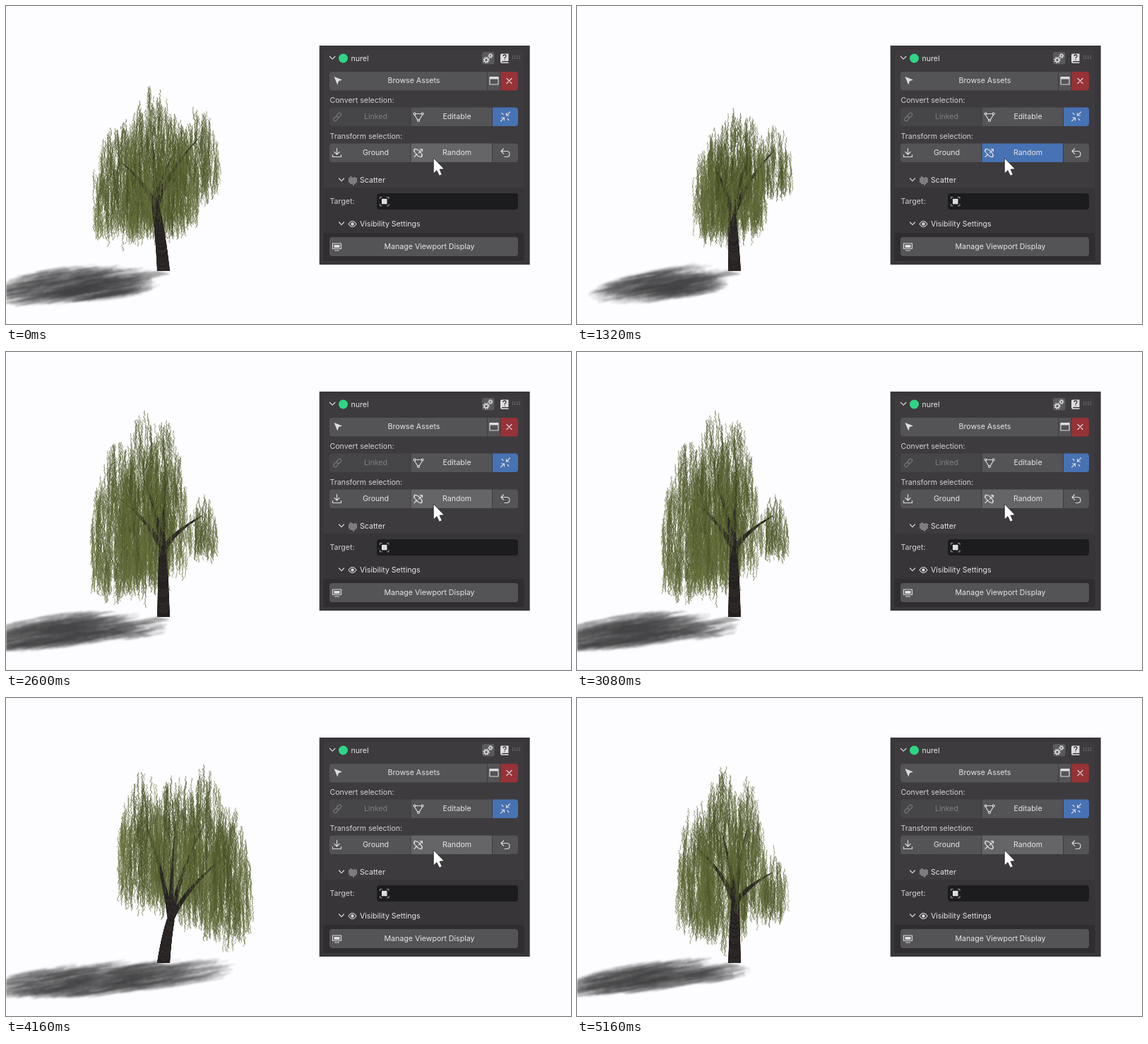
Animation, 800 px wide and 450 px high, one loop 5200 ms. Source, as an HTML page with a canvas:

```html
<!DOCTYPE html>
<html lang="en">
<head>
<meta charset="utf-8">
<title>Random transform</title>
<style>
  html, body { margin: 0; width: 100%; height: 100%; overflow: hidden; background: #fdfcfe; }
  canvas, svg { position: absolute; left: 0; top: 0; width: 800px; height: 450px; }
  text { font: 10.6px Inter, "Open Sans", sans-serif; fill: #e6e5e6; }
  .label { fill: #d2d1d3; }
  .mid { text-anchor: middle; }
  .btn { fill: #545356; }
  .line { fill: none; stroke: #d8d7d9; stroke-width: 1.2; stroke-linecap: round; stroke-linejoin: round; }
  .solid { fill: #dddcde; }
</style>
</head>
<body>
<canvas id="stage" width="800" height="450"></canvas>
<svg viewBox="0 0 800 450">
  <!-- panel -->
  <rect x="443.7" y="56" width="298" height="310" fill="#39373a"/>
  <rect x="449.5" y="62" width="284" height="299" rx="4" fill="#3d3b3e"/>
  <rect x="449.5" y="257" width="284" height="104" rx="3" fill="#373538"/>
  <rect x="449.5" y="321" width="284" height="40" rx="3" fill="#2f2d30"/>

  <!-- header -->
  <path class="line" d="M458.5 71.5l3.7 3.7 3.7-3.7M471.5 244l3.5 3.7 3.5-3.7M471.5 306l3.5 3.7 3.5-3.7"/>
  <circle cx="477.5" cy="74" r="6.5" fill="#2fd584"/>
  <text x="488.5" y="77.5">nurel</text>
  <rect x="674" y="65" width="17.5" height="17.5" rx="3" fill="#5a595c"/>
  <g fill="none" stroke="#e0dfe1">
    <circle cx="680" cy="76.5" r="2.5" stroke-width="1.5"/>
    <circle cx="680" cy="76.5" r="4" stroke-width="1.4" stroke-dasharray="1.6 1.54"/>
    <circle cx="686" cy="70.5" r="1.8" stroke-width="1.3"/>
    <circle cx="686" cy="70.5" r="3" stroke-width="1.2" stroke-dasharray="1.3 1.06"/>
  </g>
  <path class="solid" d="M702 67.5h9.5v10.5h-9a1 1 0 0 0 0 1.5h9v1.5h-9.5q-2-.5-2-2.5v-9q0-2 2-2z"/>
  <path d="M704 71q0-2 2-2t2 2q0 1-1.9 2.2v1M706.1 75.5v1" fill="none" stroke="#39373a" stroke-width="1.3"/>
  <path d="M717 71h11M717 73.8h11" stroke="#99989a" stroke-width="1.2" stroke-dasharray="1.2 2"/>

  <!-- browse row -->
  <path class="btn" d="M462 93h219v26.5h-219q-4 0-4-4v-18.5q0-4 4-4zM682 93h17.5v26.5h-17.5z"/>
  <path d="M700.5 93h20.5q4 0 4 4v18.5q0 4-4 4h-20.5z" fill="#973236"/>
  <path class="solid" d="M464.5 100l11.5 4.5-5 1.7-1.7 5.3z"/>
  <text class="mid" x="577.5" y="109.3">Browse Assets</text>
  <path class="line" d="M685 100.5h12v10.5h-12z"/>
  <path class="solid" d="M685 100h12v3.5h-12z"/>
  <path class="line" d="M709 102.5l7 7M716 102.5l-7 7"/>

  <!-- convert row -->
  <text class="label" x="458.5" y="137">Convert selection:</text>
  <path d="M462 143.5h110.5v26.5h-110.5q-4 0-4-4v-18.5q0-4 4-4z" fill="#464548"/>
  <path class="btn" d="M573.5 143.5h114.5v26.5h-114.5z"/>
  <path d="M689 143.5h32q4 0 4 4v18.5q0 4-4 4h-32z" fill="#4772b3"/>
  <g class="line" style="stroke:#767578">
    <rect x="-3.5" y="-2.3" width="7" height="4.6" rx="2.3" transform="translate(467 159.5) rotate(-45)"/>
    <rect x="-3.5" y="-2.3" width="7" height="4.6" rx="2.3" transform="translate(471.5 154.5) rotate(-45)"/>
  </g>
  <text class="mid" x="523.5" y="160.3" style="fill:#7f7e81">Linked</text>
  <path class="line" d="M579.5 152.5h9M578.5 154l4.5 7.5M589.5 154l-4.5 7.5"/>
  <g class="line"><circle cx="578.5" cy="152.5" r="1.5"/><circle cx="589.7" cy="152.5" r="1.5"/><circle cx="584" cy="162" r="1.5"/></g>
  <text class="mid" x="638.5" y="160.3">Editable</text>
  <path class="line" d="M713.5 150l-5 5m0-3.5v3.5h3.8M700.5 163l5-5m0 3.8v-3.8h-3.8M702 151.5l2 2M712 161.5l-2-2"/>

  <!-- transform row -->
  <text class="label" x="458.5" y="188">Transform selection:</text>
  <path class="btn" d="M462 194.5h110.5v26.5h-110.5q-4 0-4-4v-18.5q0-4 4-4zM689 194.5h32q4 0 4 4v18.5q0 4-4 4h-32z"/>
  <rect id="random" x="573.5" y="194.5" width="114.5" height="26.5"/>
  <path class="line" d="M468.5 201.5v8.5m-3.5-3.5l3.5 3.5 3.5-3.5M462.5 210.5v3h12v-3"/>
  <text class="mid" x="523.5" y="211.3">Ground</text>
  <g class="line" transform="translate(583.5 208)">
    <ellipse rx="7" ry="3.2" transform="rotate(45)"/>
    <path d="M-5.5-1.5q-1-4 1.5-4.5M-5.5 5.5l4-4M1 0l4.5-5M2.5-5.5h3.5v3.5M5 1q2 4-1 5"/>
  </g>
  <text class="mid" x="638.5" y="211.3">Random</text>
  <path class="line" d="M704.5 202l-3.5 3.5 3.5 3.5M701.5 205.5h7.5q4 0 4 4t-4 4h-3"/>

  <!-- scatter -->
  <path d="M486 243v7M488 241v11M490 242v10M492 243v11M494 242v10M496 243v7" stroke="#a9a8ab" stroke-width="1.2"/>
  <text x="501" y="250">Scatter</text>
  <text class="label" x="458.5" y="280">Target:</text>
  <rect x="525" y="265" width="200" height="23" rx="4" fill="#1c1b1d"/>
  <rect class="solid" x="532" y="272.8" width="7.5" height="7.5"/>
  <path d="M529.5 273v-2.5h3M539 270.5h3v2.5M542 280v2.8h-3M532.5 282.8h-3v-2.8" fill="none" stroke="#a09fa1"/>

  <!-- visibility -->
  <path class="line" d="M485 308.5q5.5-8 11 0q-5.5 8-11 0z"/>
  <circle class="solid" cx="490.5" cy="308.5" r="2.2"/>
  <text x="501" y="312">Visibility Settings</text>
  <rect class="btn" x="458" y="327" width="267" height="27" rx="4"/>
  <path class="line" d="M462.5 336h12v7.5h-12zM465.5 346h6"/>
  <path class="solid" d="M464.5 338h8v4h-8z"/>
  <text class="mid" x="599.5" y="344.2">Manage Viewport Display</text>

  <!-- pointer -->
  <path d="M605.3 215v22l4.7-4.3 3.5 7.5 3.8-1.8-3.3-7.2 6.3-.5z" fill="#fff" stroke="#29282a" stroke-width=".8"/>
</svg>
<script>
const LOOP = 5200, PRESS = 160;
const BASE = { x: 223, y: 375 };
const stage = document.getElementById('stage').getContext('2d');
const randomButton = document.getElementById('random');

// Each pose: where the trunk forks, and the crown's lobes as centre x, top, radius, low end.
const lobe = (x, top, radius, low) => ({ x, top, radius, low, height: low - top });
const pose = (start, x, y, ...lobes) => ({ start, fork: { x, y }, lobes });
const poses = [
  pose(0, 212, 285, lobe(165, 155, 42, 348), lobe(208, 110, 45, 350), lobe(235, 150, 40, 330), lobe(272, 136, 30, 285)),
  pose(560, 220, 300, lobe(195, 165, 30, 345), lobe(220, 141, 45, 350), lobe(245, 150, 25, 325), lobe(280, 165, 25, 275)),
  pose(1400, 203, 300, lobe(130, 178, 34, 368), lobe(180, 143, 45, 355), lobe(205, 150, 30, 345), lobe(245, 168, 29, 310)),
  pose(2400, 222, 280, lobe(160, 120, 40, 368), lobe(195, 82, 40, 365), lobe(225, 92, 32, 340), lobe(278, 195, 22, 300)),
  pose(3360, 217, 290, lobe(168, 140, 30, 335), lobe(202, 80, 38, 355), lobe(250, 84, 35, 335), lobe(295, 130, 23, 245)),
  pose(4140, 233, 315, lobe(195, 98, 37, 310), lobe(240, 97, 40, 320), lobe(280, 92, 38, 345), lobe(314, 145, 33, 364)),
  pose(4900, 224, 290, lobe(170, 135, 29, 355), lobe(205, 92, 35, 372), lobe(240, 110, 28, 335), lobe(277, 205, 20, 325))
];

let seed = 1;
function rnd() {
  seed = seed + 0x6D2B79F5 | 0;
  let n = Math.imul(seed ^ seed >>> 15, 1 | seed);
  n = n + Math.imul(n ^ n >>> 7, 61 | n) ^ n;
  return ((n ^ n >>> 14) >>> 0) / 4294967296;
}
const mix = (a, b, k) => a + (b - a) * k;

function layer() {
  const canvas = document.createElement('canvas');
  canvas.width = 800;
  canvas.height = 450;
  return canvas.getContext('2d');
}

// Strands hang from a dome: u runs sideways, v towards the viewer.
function growStrands({ x, top, radius, low, height }) {
  return Array.from({ length: radius * height / 19 }, () => {
    const angle = rnd() * 2 * Math.PI, r2 = rnd();
    const u = Math.sqrt(r2) * Math.cos(angle), v = Math.sqrt(r2) * Math.sin(angle);
    const crest = top + 0.42 * height * r2, hem = low - 0.12 * height * r2;
    const drop = 0.78 * rnd() ** 1.2;
    const y = mix(crest, hem, drop);
    return {
      x: x + radius * u, y, depth: radius * v,
      end: Math.min(y + 20 + rnd() * 50, hem - rnd() ** 2 * 35),
      light: Math.min(1, 0.08 + 0.35 * r2 + 0.9 * (drop - 0.35) ** 2 + 0.35 * rnd()),
      front: v > 0 && drop < 0.45
    };
  });
}

function drawStrand(c, { x, y, end, light }) {
  const lean = (rnd() - 0.5) * 0.2;
  c.strokeStyle = `rgba(${mix(40, 140, light)},${mix(50, 150, light)},${mix(14, 90, light)},${0.55 + 0.35 * rnd()})`;
  c.beginPath();
  for (; y < end; y += 2.4) {
    x += lean + (rnd() - 0.5) * 1.4;
    c.moveTo(x, y);
    c.lineTo(x + (rnd() - 0.5) * 3.6, y + 2 + rnd() * 2);
  }
  c.stroke();
}

// A tapering quadratic curve made of dots, with uneven bark shades.
function drawLimb(c, from, bend, to, wide, thin) {
  for (let k = 0; k <= 1; k += 0.012) {
    const at = axis => mix(mix(from[axis], bend[axis], k), mix(bend[axis], to[axis], k), k);
    const shade = 30 + rnd() * 16;
    c.fillStyle = `rgb(${shade + 5},${shade + 1},${shade})`;
    c.beginPath();
    c.arc(at('x'), at('y'), mix(wide, thin, k) / 2, 0, 7);
    c.fill();
  }
}

function drawLimbs(c, { fork, lobes }) {
  c.save();
  c.beginPath();
  c.rect(0, 0, 800, BASE.y);
  c.clip();
  drawLimb(c, BASE, { x: mix(BASE.x, fork.x, 0.4), y: mix(BASE.y, fork.y, 0.6) }, fork, 18, 11);
  for (const { x, top, height } of lobes) {
    const tip = { x, y: top + 0.35 * height };
    drawLimb(c, fork, { x: mix(fork.x, x, 0.3), y: mix(fork.y, tip.y, 0.55) }, tip, 8, 1.2);
  }
  c.restore();
}

// Low sun from the right: height turns into distance along the ground.
function drawShadow(c, strands) {
  const soft = layer();
  const cast = (x, y, depth) => {
    const h = BASE.y - y;
    return [BASE.x + (x - BASE.x) * 1.1 - h * 0.87, BASE.y + 2 + h * 0.155 + depth * 0.48];
  };
  const streak = (x, y, end, depth) => {
    soft.beginPath();
    soft.moveTo(...cast(x, y, depth));
    soft.lineTo(...cast(x, end, depth));
    soft.stroke();
  };
  soft.strokeStyle = 'rgba(66,66,70,.11)';
  soft.lineWidth = 2.2;
  strands.forEach(s => streak(s.x, s.y, s.end, s.depth));
  for (let i = -8; i <= 8; i++) streak(BASE.x + i, BASE.y - 90, BASE.y, i / 2);
  c.filter = 'blur(1.3px)';
  c.drawImage(soft.canvas, 0, 0);
  c.filter = 'none';
}

function render(tree) {
  const c = layer();
  seed = tree.start + 7;
  const strands = tree.lobes.flatMap(growStrands);
  drawShadow(c, strands);
  c.lineWidth = 0.85;
  strands.filter(s => !s.front).forEach(s => drawStrand(c, s));
  drawLimbs(c, tree);
  strands.filter(s => s.front).forEach(s => drawStrand(c, s));
  return c.canvas;
}

function frame() {
  const t = performance.now() % LOOP;
  const tree = poses.findLast(p => t >= p.start);
  const pressed = poses.some(p => t < p.start && t >= p.start - PRESS);
  tree.image ??= render(tree);
  randomButton.setAttribute('fill', pressed ? '#4772b3' : '#656467');
  stage.clearRect(0, 0, 800, 450);
  stage.drawImage(tree.image, 0, 0);
  requestAnimationFrame(frame);
}
frame();
</script>
</body>
</html>
```
